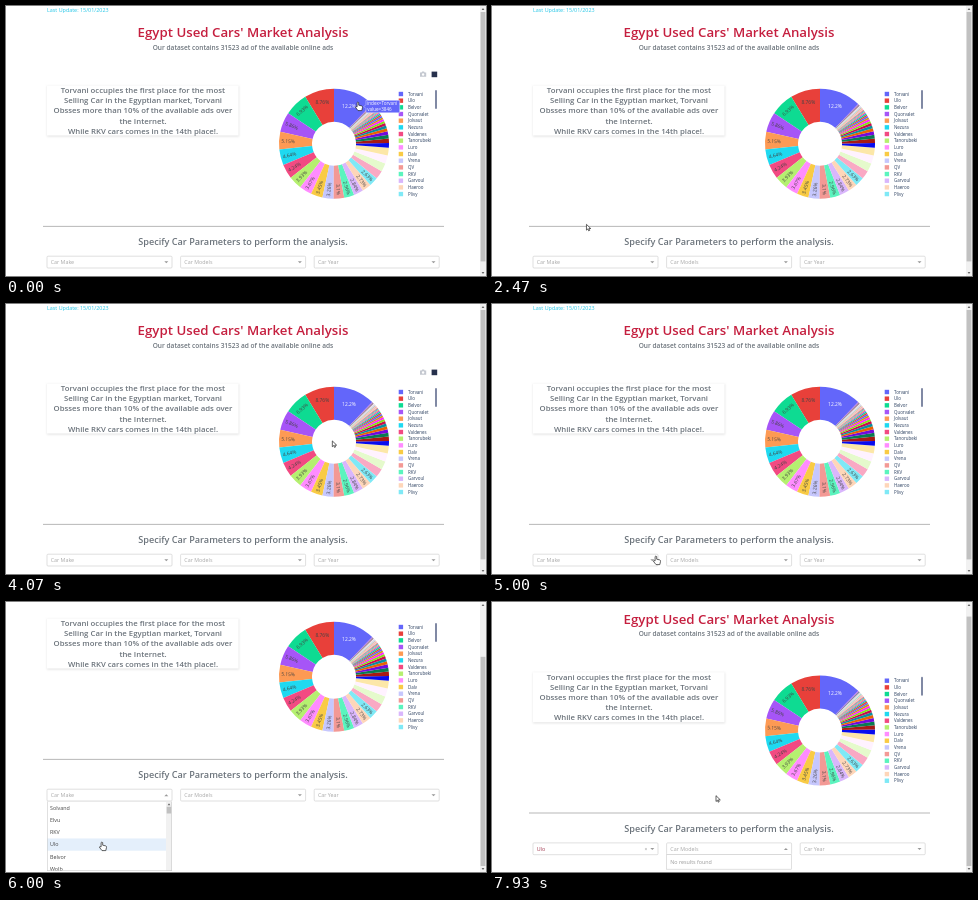
Write an HTML page that moves like this. It is 480 by 270 pixels and loops after 8000 ms.

```html
<!DOCTYPE html>
<html lang="en">
<head>
<meta charset="utf-8">
<title>Used cars dashboard</title>
<style>
html, body { margin: 0; width: 100%; height: 100%; overflow: hidden; background: #fff; }
svg { display: block; width: 100%; height: 100%; }
text { font-family: "Open Sans", "Noto Sans", sans-serif; }
.mid { text-anchor: middle; }
.semi { font-weight: 600; }
</style>
</head>
<body>
<svg viewBox="0 0 480 270">
  <defs>
    <filter id="soft" x="-5%" y="-10%" width="110%" height="125%"><feGaussianBlur stdDeviation="1"/></filter>
    <clipPath id="listClip"><rect x="41" y="262.5" width="125" height="69.5"/></clipPath>
  </defs>
  <g id="page"></g>
  <g id="bar"></g>
  <g id="pointer" stroke="#222" stroke-width=".7" stroke-linejoin="round" fill="#fff">
    <path id="arrow" d="M0 0v5.8l1.4-1.2.8 1.9 1-.4-.8-1.9h1.9z"/>
    <path id="hand" d="M-.9.6q.8-1.2 1.6 0v2.6l3 .7q1 .3.8 1.5l-.7 3.2h-3.8l-2.7-3.5q.3-1 1.8-.2z"/>
  </g>
</svg>
<script>
const LOOP = 8000, STEP = 1000 / 15;
const $ = id => document.getElementById(id);
const page = $('page');

function add(parent, tag, attrs, content) {
  const node = document.createElementNS('http://www.w3.org/2000/svg', tag);
  for (const key in attrs) node.setAttribute(key, attrs[key]);
  if (content !== undefined) node.textContent = content;
  parent.append(node);
  return node;
}
const rect = (parent, x, y, width, height, fill, more) =>
  add(parent, 'rect', { x, y, width, height, fill, ...more });
const label = (parent, x, y, size, fill, content, more) =>
  add(parent, 'text', { x, y, 'font-size': size, fill, ...more }, content);
const heading = (x, y, size, fill, content) =>
  label(page, x, y, size, fill, content, { class: 'mid semi' });
const triangle = (parent, x, y, up, size = 2, fill = '#999') =>
  add(parent, 'path', { d: `M${x - size} ${y + (up ? 1 : -1)}h${2 * size}l${-size} ${up ? -2 : 2}z`, fill });
const show = (node, on) => node.setAttribute('visibility', on ? 'inherit' : 'hidden');
const move = (node, x, y) => node.setAttribute('transform', `translate(${x} ${y})`);

// Headings and card
const GREY = '#6b737b';
label(page, 41, 6.2, 5.4, '#22c5e6', 'Last Update: 15/01/2023');
heading(237, 31, 13.25, '#c51f3f', "Egypt Used Cars' Market Analysis");
heading(237, 43.8, 6.56, GREY, 'Our dataset contains 31523 ad of the available online ads');
rect(page, 41, 80, 192, 50.5, '#e2e2e2', { filter: 'url(#soft)' });
rect(page, 41, 79.5, 191.5, 50, '#fff');
['Torvani occupies the first place for the most',
 'Selling Car in the Egyptian market, Torvani',
 'Obsses more than 10% of the available ads over',
 'the Internet.',
 'While RKV cars comes in the 14th place!.'
].forEach((line, i) => heading(137, 87.2 + i * 10.1, 7.77, GREY, line));
rect(page, 37, 219.9, 401, 0.8, '#a6a6a6');
heading(237, 239, 9.15, GREY, 'Specify Car Parameters to perform the analysis.');

// Toolbar, seen only while the pointer is over the chart
const toolbar = add(page, 'g', {});
add(toolbar, 'path', { d: 'M414 66.5h1.5l.6-1h2l.6 1h1.5v4.2h-6.2z', fill: '#c4c8d0' });
add(toolbar, 'circle', { cx: 417.1, cy: 68.5, r: 1.2, fill: '#fff' });
rect(toolbar, 425.6, 65.6, 5.6, 5.6, '#26304c');

// Donut: the first share runs clockwise from the top, the others counterclockwise
const CX = 328, CY = 137.7, R = 55, HOLE = 22, FIRST = 12.2, COUNT = 64, ADS = 31523;
const makes = ('Torvani Ulo Belvor Quorvalet Jolvaut Nezura Valdenes Tanorubeki ' +
  'Luro Dalv Vrena QV RKV Garvoul Haeroo Plivy').split(' ');
const palette = ('#6366fa #e8403a #0edb92 #a655f7 #fd9a54 ' +
  '#1fd9f0 #f24a82 #b5f070 #ff8cff #f9cb45').split(' ');

// Each round through the palette is plain, lightened or darkened
function shade(i) {
  const rgb = palette[i % 10].match(/\w\w/g).map(h => parseInt(h, 16) / 255);
  const light = (Math.max(...rgb) + Math.min(...rgb)) / 2;
  const goal = Math.min(1, light + [0, 0.2, -0.2][Math.floor(i / 10) % 3]);
  const chroma = (1 - Math.abs(2 * goal - 1)) / (1 - Math.abs(2 * light - 1));
  return `rgb(${rgb.map(c => Math.round(255 * (goal + (c - light) * chroma)))})`;
}
function polar(percent, r) {
  const a = percent * Math.PI / 50;
  return [CX - r * Math.sin(a), CY - r * Math.cos(a)];
}

// A power law for the common makes, then a shrinking tail that fills the ring
const slices = [];
for (let i = 0, from = -FIRST; i < COUNT; i++) {
  const left = 100 - FIRST - from;
  const share = i === 0 ? FIRST : i < 20 ? 8.76 * ((i + 1) / 2) ** -0.579
    : i < COUNT - 1 ? left / 10 : left;
  slices.push({ i, from, share, to: from + share, mid: from + share / 2, fill: shade(i) });
  from += share;
}
for (const { from, to, fill } of slices) {
  add(page, 'path', {
    d: `M${polar(from, R)}A${R} ${R} 0 0 0 ${polar(to, R)}L${polar(to, HOLE)}A${HOLE} ${HOLE} 0 0 1 ${polar(from, HOLE)}z`,
    fill
  });
}
const inkOn = i => i ? '#444' : '#fff';
makes.forEach((name, i) => {
  const { share, mid, fill } = slices[i];
  const [x, y] = polar(mid, Math.min(46, 40 + 3 * i));
  const radial = 90 - mid * 3.6;
  const turn = i < 2 ? 0 : i === 2 ? -40 : radial < -90 ? radial + 180 : radial;
  label(page, 0, 1.7, 4.9, inkOn(i), +share.toFixed(2) + '%',
    { class: 'mid', transform: `translate(${x} ${y}) rotate(${turn})` });

  const row = 88 + i * 6.67;
  rect(page, 392.7, row - 2.2, 4.4, 4.4, fill);
  label(page, 402, row + 1.6, 4.45, '#2a3f5f', name);
});
rect(page, 429, 84, 2, 19, '#8089a4', { rx: 1 });

function sliceAt(x, y) {
  const dx = x - CX, dy = y - CY, r = Math.hypot(dx, dy);
  if (r < HOLE || r > R) return;
  const turn = (Math.atan2(-dx, -dy) * 50 / Math.PI + 100 + FIRST) % 100 - FIRST;
  return slices.find(s => turn < s.to);
}

// Hover label, anchored to the circle inscribed in the slice
const tip = add(page, 'g', {});
const tipBox = add(tip, 'path', { stroke: '#fff', 'stroke-width': 0.4 });
const tipLines = [-1.1, 4.5].map(y => label(tip, 3.2, y, 4.6, '#fff', ''));
function drawTip(slice) {
  show(tip, slice);
  if (!slice) return;
  const { i, share, mid, fill } = slice, name = makes[i] || 'Movane';
  const inset = Math.min(0.3, 1 / (1 + 1 / Math.sin(share * Math.PI / 100)));
  const [x, y] = polar(mid, R * (1 - inset));
  const width = (6 + name.length) * 2.6;
  move(tip, x + inset * R, y);
  tipBox.setAttribute('d', `M0 0l2-2v-4.2h${width}v12.4h${-width}v-4.2z`);
  tipBox.setAttribute('fill', fill);
  tipLines[0].textContent = 'index=' + name;
  tipLines[1].textContent = 'value=' + Math.round(share * ADS / 100);
  tipLines.forEach(line => line.setAttribute('fill', inkOn(i)));
}

// Select boxes
const selects = ['Car Make', 'Car Models', 'Car Year'].map((name, i) => {
  const x = 41 + i * 133.6;
  rect(page, x, 250.2, 125, 11.8, '#fff', { stroke: '#ccc', 'stroke-width': 0.6, rx: 1 });
  return {
    hint: label(page, x + 3.7, 258.2, 5.35, '#a8a8a8', name),
    down: triangle(page, x + 119.3, 256.3, false),
    up: triangle(page, x + 119.3, 256.3, true)
  };
});
const chosen = add(page, 'g', {});
label(chosen, 44.7, 258.2, 5.35, '#a0384f', 'Ulo');
label(chosen, 152.6, 258, 5, '#999', '×');
const caret = rect(page, 44.6, 252.7, 0.6, 7, '#333');

const LIST_TOP = 262.7, ROW = 12.25, LIST_RIGHT = 160;
const list = add(page, 'g', { 'clip-path': 'url(#listClip)' });
rect(list, 41, 262.5, 125, 69.5, '#fff');
const marker = rect(list, 41, LIST_TOP, 119, ROW, '#e4effb');
['Solvand', 'Elvu', 'RKV', 'Ulo', 'Belvor', 'Wolb'].forEach((name, i) =>
  label(list, 44, LIST_TOP + ROW * i + 8, 5.35, '#444', name));
rect(list, LIST_RIGHT, 262.5, 6, 69.5, '#f1f1f1');
rect(list, 160.7, 267.7, 4.6, 6.8, '#c1c1c1');
triangle(list, 163, 265.2, true, 1.4, '#666');
rect(list, 41.3, 262.2, 124.4, 69.5, 'none', { stroke: '#ccc', 'stroke-width': 0.6 });

const noResults = add(page, 'g', {});
rect(noResults, 174.6, 262, 125, 14.5, '#fff', { stroke: '#ccc', 'stroke-width': 0.6 });
label(noResults, 178.3, 271.4, 5.35, '#999', 'No results found');

// Window scrollbar
const bar = $('bar');
rect(bar, 474, 0, 6, 270, '#f1f1f1');
const thumb = rect(bar, 474.6, 6, 4.8, 249, '#c1c1c1');
triangle(bar, 477, 3, true, 1.4, '#666');
triangle(bar, 477, 267, false, 1.4, '#666');

// Motion: key points as [time, ...values]
const OPEN = 5120, PICK = 6260, EMPTY = 7390;
const scrollPath = [[0, 0], [OPEN, 0], [5260, 54.5], [5470, 63], [PICK, 63], [6400, 9.3]];
const pointerPath = [
  [0, 352, 96], [400, 376, 142], [870, 309, 180], [1400, 278, 140], [1600, 279, 126],
  [1730, 345, 95], [2130, 62, 120], [2400, 70, 229], [3200, 363.6, 101], [3450, 363.6, 101],
  [3700, 425, 67], [4670, 164, 252], [OPEN, 164, 252], [5260, 161.5, 236], [5930, 96, 240],
  [PICK, 96, 240], [7200, 292, 252], [EMPTY, 292, 252], [7800, 218, 199], [LOOP, 227, 191]
];

function track(keys, t) {
  const next = keys.findIndex(k => k[0] > t);
  if (next < 0) return keys[keys.length - 1].slice(1);
  const a = keys[next - 1], b = keys[next], p = (t - a[0]) / (b[0] - a[0]);
  return a.slice(1).map((v, i) => v + (b[i + 1] - v) * p);
}

function draw(ms) {
  const t = Math.floor((ms % LOOP + 5) / STEP) * STEP;
  const [scroll] = track(scrollPath, t);
  const [x, y] = track(pointerPath, t);
  const pageY = y + scroll;
  const open = t >= OPEN && t < PICK, picked = t >= PICK, empty = t >= EMPTY;

  move(page, 0, -scroll);
  const height = open ? 333 : Math.max(279.3, 270 + scroll);
  thumb.setAttribute('y', 6 + scroll * 258 / height);
  thumb.setAttribute('height', 258 * 270 / height);

  const slice = sliceAt(x, pageY);
  drawTip(slice);
  show(toolbar, x > 240 && x < 440 && pageY > 55 && pageY < 210);

  show(list, open);
  show(caret, open && t < OPEN + 500);
  show(chosen, picked);
  show(selects[0].hint, !picked);
  show(noResults, empty);
  [open, empty, false].forEach((up, i) => {
    show(selects[i].up, up);
    show(selects[i].down, !up);
  });
  const row = x < LIST_RIGHT ? Math.floor((pageY - LIST_TOP) / ROW) : 0;
  marker.setAttribute('y', LIST_TOP + Math.max(0, row) * ROW);

  const onSelect = pageY > 250 && pageY < 262;
  const onRow = open && x < LIST_RIGHT && pageY > LIST_TOP;
  const clickable = Boolean(slice || onSelect || onRow);
  move($('pointer'), x, y);
  show($('hand'), clickable);
  show($('arrow'), !clickable);
}

const start = performance.now();
function tick() {
  draw(performance.now() - start);
  requestAnimationFrame(tick);
}
tick();
</script>
</body>
</html>
```
